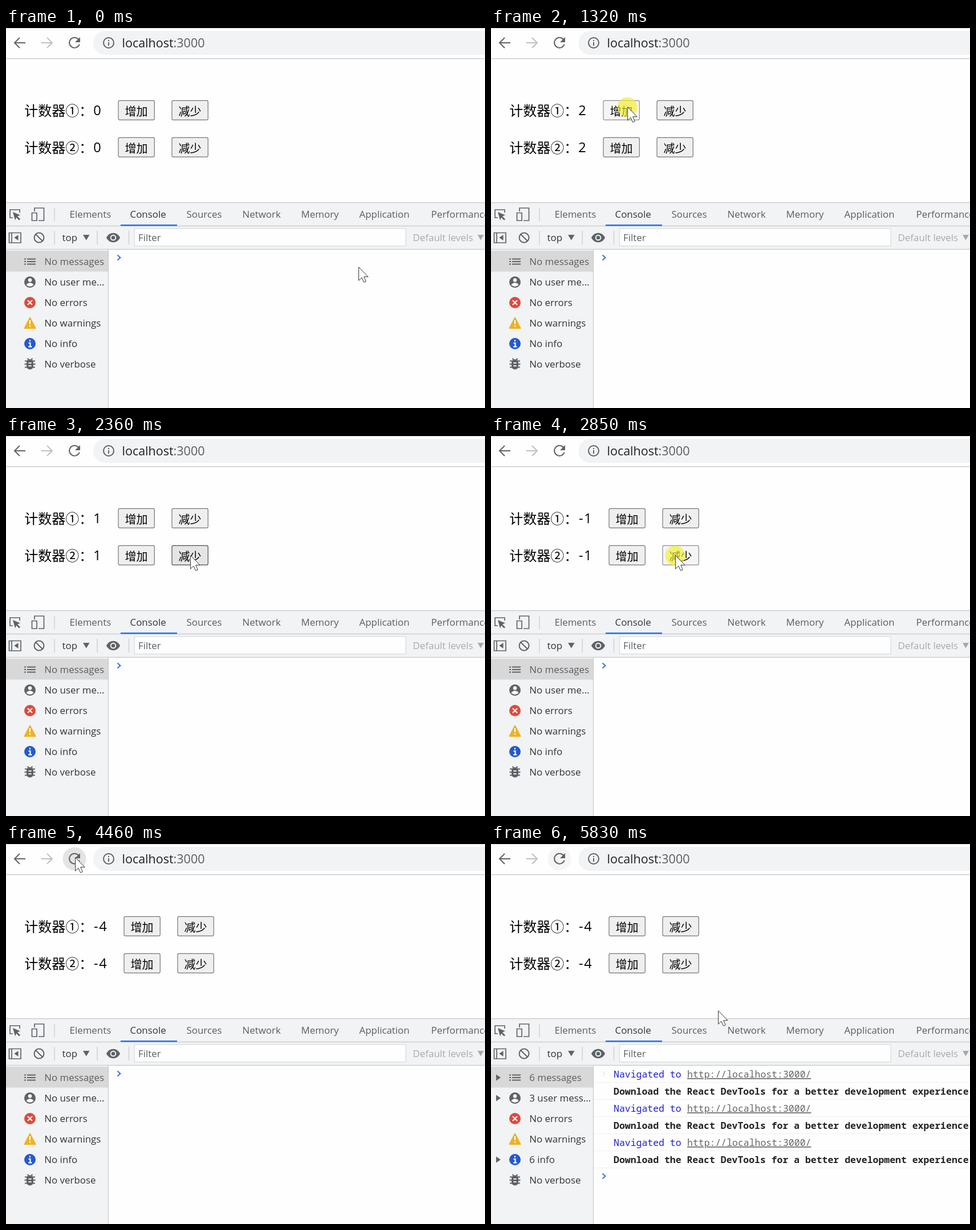
Recreate the animation shown at these times as an HTML page. Size 840x667 px, loop 5900 ms.

```html
<!DOCTYPE html>
<html lang="zh-CN">
<head>
<meta charset="utf-8">
<title>Counter</title>
<style>
html, body { margin: 0; width: 100%; height: 100%; overflow: hidden; background: #fefefe; }
svg { display: block; width: 840px; height: 667px; }
text { font: 16.9px "Open Sans", "Noto Sans", sans-serif; fill: #333; white-space: pre; }
.cjk { font-family: "Noto Sans CJK SC", "Noto Sans CJK", sans-serif; fill: #000; }
.label { font-size: 24px; }
.count { font-size: 23.5px; fill: #000; }
.btn { font-size: 20px; }
.url { font-size: 21.5px; fill: #202124; }
.mono { font: 16.48px "Noto Sans Mono", "DejaVu Sans Mono", monospace; }
.bold { font-weight: 600; fill: #222; }
.soft { fill: #5a5d61; }
.pale { fill: #a8aaad; }
.line { fill: none; stroke: #5f6368; stroke-width: 2; }
.thin { stroke-width: 1.7; }
.rule { stroke: #cbcdd1; stroke-width: 1.3; }
.icon { fill: #5f6368; }
.white { fill: none; stroke: #fff; stroke-width: 2.2; }
</style>
</head>
<body>
<svg viewBox="0 0 840 667" xmlns="http://www.w3.org/2000/svg">
  <rect width="840" height="667" fill="#fefefe"/>

  <!-- browser bar -->
  <rect width="840" height="1" fill="#d5d7da"/>
  <rect y="53" width="840" height="1.5" fill="#d0d1d3"/>
  <circle id="halo" cx="120" cy="26" r="20.5"/>
  <path class="line" d="M34 26H16M24 17l-9 9 9 9"/>
  <path class="line" d="M62 26H80M72 17l9 9-9 9" style="stroke:#bdbfc2"/>
  <path class="line" d="M127 20A9 9 0 1 0 128.700 28.500"/>
  <path class="icon" d="M130 16v9h-9z"/>
  <rect x="153" y="5" width="760" height="42" rx="21" fill="#f1f3f4"/>
  <circle class="line" cx="180" cy="26" r="9"/>
  <path class="line" d="M180 31V25M180 23V21"/>
  <text class="url" x="203.500" y="34">localhost<tspan class="soft">:3000</tspan></text>

  <g id="counters"></g>

  <g id="bubble">
    <path d="M0 272H732q4 0 4 4V306H0z" fill="#dee1e6"/>
    <text class="cjk" x="-1" y="297.500" style="font-size:18px;fill:#4a4d51">正在连接...</text>
  </g>

  <!-- developer tools -->
  <rect y="306" width="840" height="82" fill="#f1f3f4"/>
  <path class="rule" d="M0 306.500H840M0 347.500H840M0 388.500H840"/>
  <rect y="389" width="179" height="278" fill="#f1f3f4"/>
  <rect y="391" width="179" height="36.500" fill="#d8d8d8"/>
  <path class="rule" d="M179.500 388V667M85 316V339M85 356V380M160 356V380M215.500 356V380"/>
  <rect x="201" y="345" width="99" height="2.400" fill="#1a73e8"/>
  <g id="tabs"></g>

  <path class="line thin" d="M12 333H7V319H24V324"/>
  <path class="icon" d="M12 323l13 5.500-5 2 5 5-2 2-5-5-2 5z"/>
  <path class="line thin" d="M50 322V316H66.500V338H57M45.500 324.500H54V338H45.500z"/>
  <path class="line thin" d="M5.500 359.500H26V377H5.500zM10 359.500V377"/>
  <path class="icon" d="M21.500 363v10l-7-5z"/>
  <circle class="line" cx="58" cy="368" r="8.500"/>
  <path class="line" d="M52 362l12 12"/>
  <text x="98.500" y="374">top</text>
  <path class="icon" d="M135 363h11.500l-5.700 9.500z"/>
  <path class="icon" d="M176 368c5-11 19-11 24 0c-5 11-19 11-24 0z"/>
  <circle class="icon" cx="188" cy="368" r="4.300" stroke="#f1f3f4" stroke-width="2"/>
  <rect x="225.500" y="352" width="475.500" height="30.500" fill="#fefefe" stroke="#d8dadd" stroke-width="1.200"/>
  <text class="soft" x="232" y="374">Filter</text>
  <text class="pale" x="713.500" y="374">Default levels</text>
  <path class="pale" d="M827 363h11l-5.500 9.500z"/>

  <!-- sidebar icons -->
  <path class="line" d="M32 405.500h3m2 0h15M32 410h3m2 0h15M32 414.500h3m2 0h15"/>
  <circle class="icon" cx="42" cy="446" r="10"/>
  <circle cx="42" cy="442.500" r="3.200" fill="#fff"/>
  <path d="M35.500 451c2-5 11-5 13 0q-6.500 5.500-13 0z" fill="#fff"/>
  <circle cx="42" cy="482" r="10" fill="#df4a3c"/>
  <path class="white" d="M38 478l8 8m0-8l-8 8"/>
  <path d="M42 508.500L51.500 527h-19z" fill="#efb223" stroke="#efb223" stroke-width="2" stroke-linejoin="round"/>
  <path class="white" d="M42 513v7m0 2v2.500"/>
  <circle cx="42" cy="554" r="10" fill="#2459cf"/>
  <path class="white" d="M42 547.500v2.800m-2.500 2.700h3v6.500m-3.500 0h6.500"/>
  <path class="line" d="M33 584.500h18m-18.500 5.500h19m-18.500 5.500h18M37.500 580l3 3m6-3l-3 3"/>
  <rect class="icon" x="36" y="581.500" width="12" height="18" rx="6"/>
  <path d="M39.500 588h5m-5 5h5" stroke="#f1f3f4" stroke-width="2"/>
  <g id="sidebar"></g>

  <g id="log"></g>
  <path id="first" class="line" d="M195.500 399l5 4.500-5 4.500" style="stroke:#eee"/>
  <path id="prompt" class="line" d="M195.500 398.500l5 4.500-5 4.500" style="stroke:#3573d9"/>

  <circle id="press" r="17.500" fill="#f4ee2c" opacity=".65"/>
  <path id="cursor" d="M0 0V23.500L5.300 18.400L9 26.600L12.700 25L9.200 17H16.500z" fill="#fff" stroke="#333"/>
</svg>
<script>
const LOOP = 5900;
const STEP = 70;
const $ = id => document.getElementById(id);

function add(parent, tag, attrs, content = '') {
  const node = document.createElementNS('http://www.w3.org/2000/svg', tag);
  for (const key in attrs) node.setAttribute(key, attrs[key]);
  node.textContent = content;
  parent.appendChild(node);
  return node;
}

const show = (node, on) => node.setAttribute('visibility', on ? 'visible' : 'hidden');
const move = (node, x, y) => node.setAttribute('transform', `translate(${x} ${y})`);

const tabs = { Elements: 112, Console: 218, Sources: 317, Network: 415, Memory: 518, Application: 620, Performance: 746 };
for (const [name, x] of Object.entries(tabs)) {
  add($('tabs'), 'text', { class: name === 'Console' ? '' : 'soft', x: x - .5, y: 333 }, name);
}

const counters = ['①', '②'].map((mark, row) => {
  const top = 127 + row * 65, y = top + 26;
  const root = $('counters');
  add(root, 'text', { class: 'cjk label', x: 32.3, y: y + .5 }, `计数器${mark}：`);
  const minus = add(root, 'text', { class: 'count', x: 154, y }, '-');
  const digit = add(root, 'text', { class: 'count', x: 153.3, y });
  const group = add(root, 'g', {});
  const buttons = ['增加', '减少'].map((name, i) => {
    const x = 197 + i * 94;
    const box = add(group, 'rect', { x, y: top + .3, width: 63.3, height: 34, rx: 2.5, 'stroke-width': 1.2 });
    add(group, 'text', { class: 'cjk btn', x: x + 11.5, y: top + 26.5 }, name);
    return { box, x, top };
  });
  return { minus, digit, group, buttons };
});

// Each row knows how many entries one page load adds to it.
const sideRows = [['messages', 2], ['user me', 1], ['errors', 0], ['warnings', 0], ['info', 2], ['verbose', 0]]
  .map(([name, perLoad], i) => {
    const y = 410 + i * 36, root = $('sidebar');
    const arrow = add(root, 'path', { class: 'icon', d: `M9 ${y - 5.5}l8 5.5-8 5.5z` });
    const text = add(root, 'text', { class: i ? '' : 'soft', x: 67.3, y: y + 6 });
    return { name, perLoad, arrow, text };
  });

const visits = [0, 1, 2].map(i => {
  const y = 410 + i * 60;
  const group = add($('log'), 'g', {});
  add(group, 'path', { d: `M180 ${y + 8.5}H840m-660 30H840`, stroke: '#efefef' });
  add(group, 'text', { class: 'mono', x: 215, y, style: 'fill:#1f1fd6' }, 'Navigated to ');
  add(group, 'text', { class: 'mono', x: 344, y, style: 'fill:#666;text-decoration:underline' }, 'http://localhost:3000/');
  add(group, 'text', { class: 'mono bold', x: 215, y: y + 30 },
    'Download the React DevTools for a better development experience');
  return group;
});

// The pointer visits these places along curves pulled towards a bend point.
const home = [619, 420];
const moves = [
  { start: 70, steps: 8, bend: [1086, 330], to: [240, 139] },
  { start: 1590, steps: 7, bend: [358, 283], to: [324, 210] },
  { start: 3900, steps: 6, bend: [260, 120], to: [122, 24] },
  { start: 5760, steps: 2, bend: [250, 150], to: [399, 293] },
];
const plus = { downs: [760, 1050, 1320], held: STEP };
const less = { downs: [2080, 2220, 2510, 2780, 2990, 3130, 3690], held: 2 * STEP };
const reload = { downs: [4530, 4790, 4930], held: 2 * STEP };
const hover = { start: 4390, end: 5490 };

const passed = (clicks, t, delay) => clicks.downs.filter(down => t >= down + delay).length;
const during = (clicks, t, from, to) => clicks.downs.some(down => t >= down + from && t < down + to);

function pointer(t) {
  let from = home;
  for (const { start, steps, bend, to } of moves) {
    if (t < start) break;
    const u = Math.min(1, (Math.floor((t - start) / STEP) + 1) / steps), v = 1 - u;
    from = from.map((p, i) => v * v * p + 2 * u * v * bend[i] + u * u * to[i]);
  }
  return from;
}

function haloOpacity(t) {
  if (t < hover.start) return 0;
  return t < hover.end ? Math.min(.1, .05 + (t - hover.start) / 1400) : .035;
}

function drawCounter({ minus, digit, group, buttons }, count, x, y, pressed) {
  const shift = count < 0 ? 10 : 0;
  show(minus, count < 0);
  digit.textContent = Math.abs(count);
  move(digit, shift, 0);
  move(group, shift, 0);
  for (const { box, x: bx, top } of buttons) {
    const left = bx + shift;
    const over = x >= left && x <= left + 64 && y >= top && y <= top + 35;
    const [fill, stroke] = !over ? ['#efefef', '#767676'] : pressed ? ['#f5f5f5', '#8d8d8d'] : ['#e5e5e5', '#4f4f4f'];
    box.setAttribute('fill', fill);
    box.setAttribute('stroke', stroke);
  }
}

function drawConsole(loads) {
  visits.forEach((group, i) => show(group, i < loads));
  show($('first'), loads > 0);
  move($('prompt'), 0, loads * 60);
  for (const { name, perLoad, arrow, text } of sideRows) {
    const total = perLoad * loads;
    show(arrow, total > 0);
    const label = name !== 'user me' ? name : total ? 'user mess...' : 'user me...';
    text.textContent = `${total || 'No'} ${label}`;
  }
}

function draw(t) {
  const [x, y] = pointer(t);
  const pressed = [plus, less, reload].some(clicks => during(clicks, t, 0, clicks.held));
  const count = passed(plus, t, STEP) - passed(less, t, STEP);
  move($('cursor'), x - .4, y - .3);
  move($('press'), x - 1, y);
  show($('press'), pressed);
  $('halo').setAttribute('opacity', haloOpacity(t));
  show($('bubble'), during(reload, t, STEP, 200));
  for (const counter of counters) drawCounter(counter, count, x, y, pressed);
  drawConsole(passed(reload, t, 130));
}

function tick() {
  draw(performance.now() % LOOP);
  requestAnimationFrame(tick);
}
tick();
</script>
</body>
</html>
```
